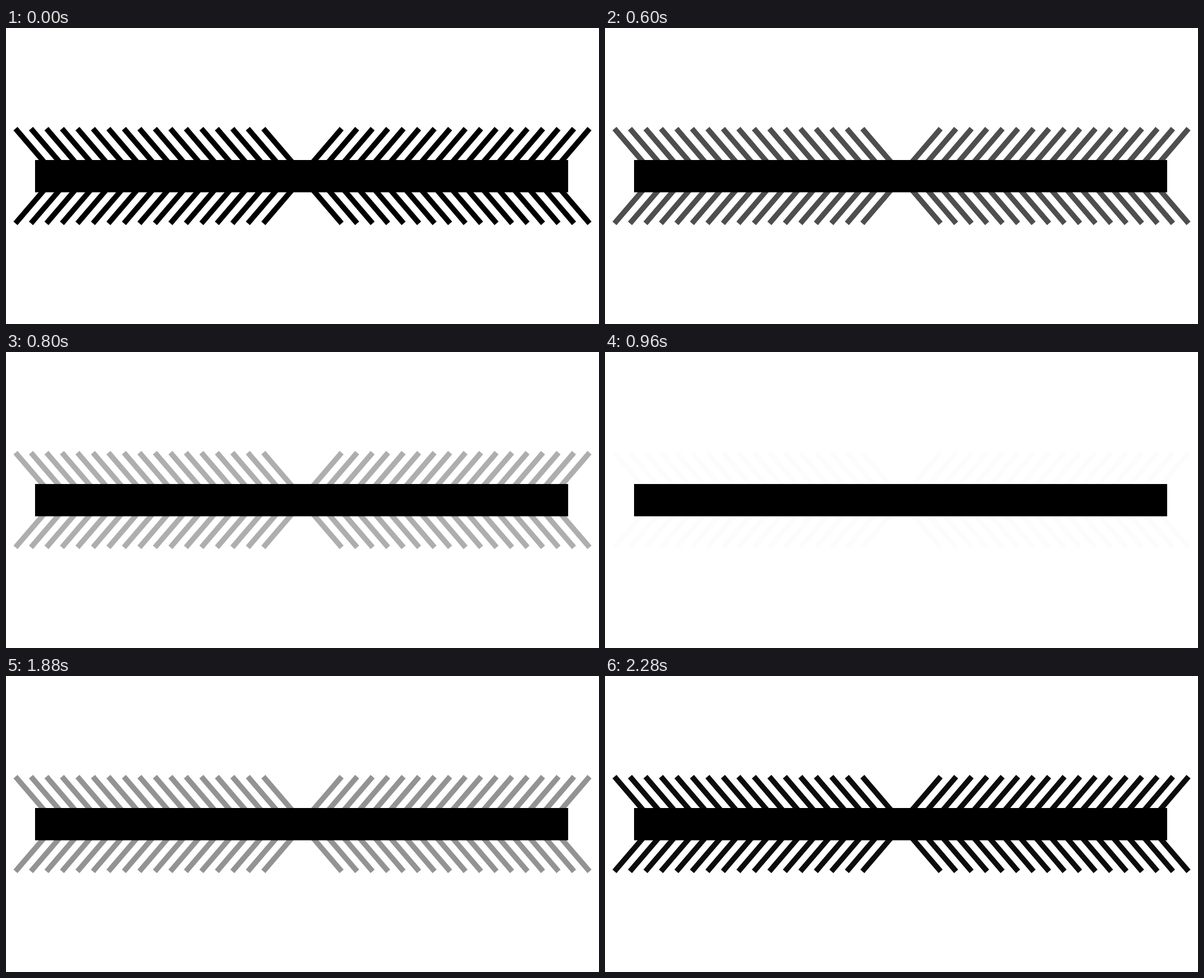
An HTML page for the animation above (2400 ms loop, 1000x500 px).

```html
<!DOCTYPE html>
<html lang="en">
<head>
<meta charset="utf-8">
<title>Fading chevrons</title>
<style>
  html, body { margin: 0; width: 100%; height: 100%; overflow: hidden; background: #fff; }
  svg { display: block; width: 100%; height: 100%; }
</style>
</head>
<body>
<svg viewBox="0 0 1000 500">
  <path id="chevrons" fill="none" stroke="#000" stroke-width="9"/>
  <rect x="49" y="223" width="899" height="54.5"/>
</svg>
<script>
  const LOOP = 2400;
  const COUNT = 17;
  const SPACING = 26.125;
  const FAINT = 0.012;
  const chevrons = document.getElementById("chevrons");

  const chevron = (x, dx) => `M${x} 170L${x + dx} 250L${x} 330`;

  let d = "";
  for (let i = 0; i < COUNT; i++) {
    const x = 16 + i * SPACING;
    d += chevron(x, 68.5) + chevron(1000 - x, -68.5);
  }
  chevrons.setAttribute("d", d);

  // Fades out in 40 ms steps, returns in 80 ms steps.
  function opacityAt(t) {
    if (t < 480) return 1;
    if (t < 960) return 1 - (Math.floor((t - 480) / 40) + 1) * (1 - FAINT) / 13;
    if (t < 1640) return FAINT;
    return Math.min(8, Math.floor((t - 1640) / 80)) * 0.106 + 0.106;
  }

  function draw(now) {
    chevrons.setAttribute("opacity", opacityAt(now % LOOP));
  }

  const start = performance.now();
  function tick() {
    draw(performance.now() - start);
    requestAnimationFrame(tick);
  }
  tick();
</script>
</body>
</html>
```
